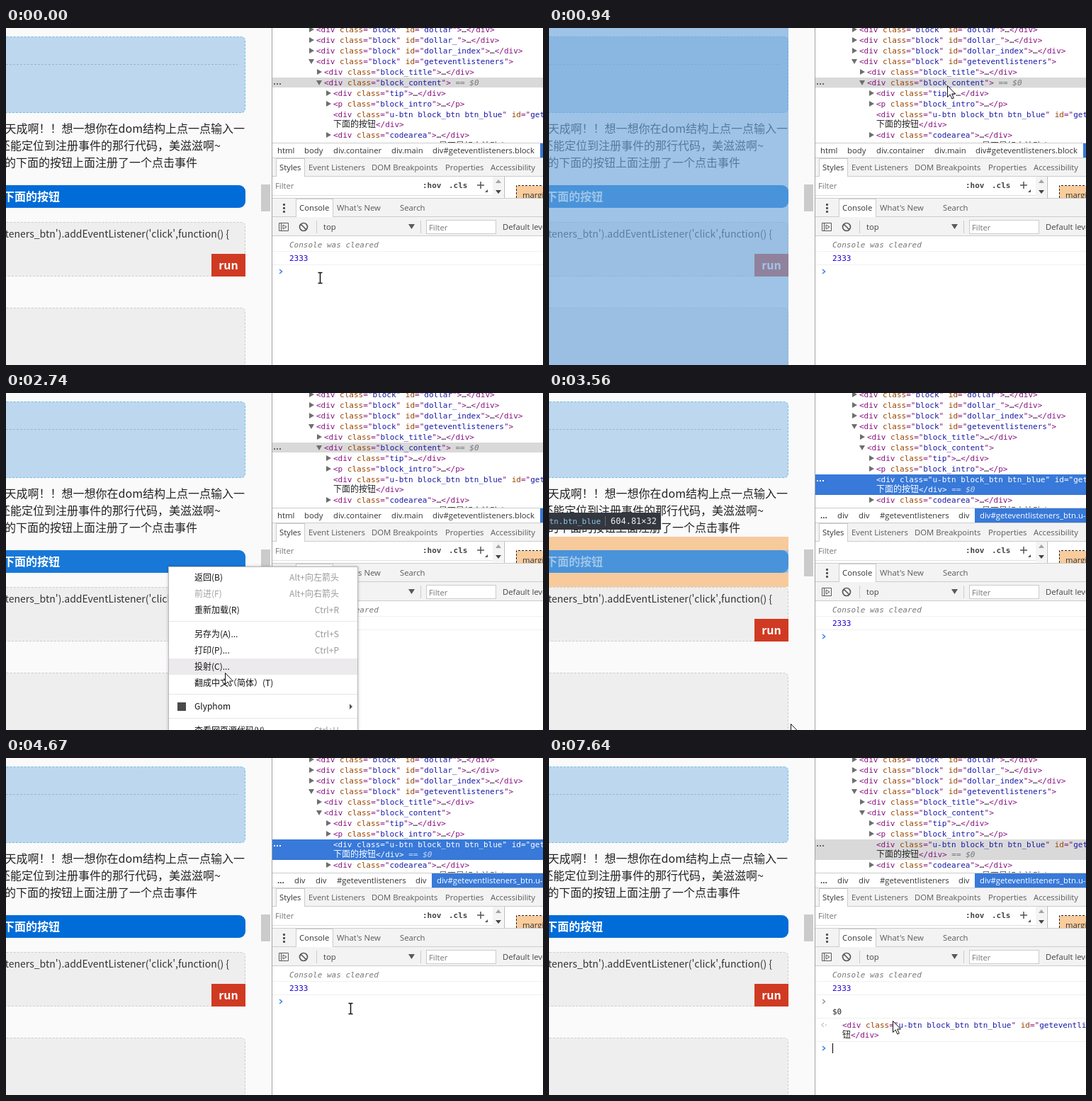
Recreate the animation shown at these times as an HTML page with a canvas. Size 758 px wide and 476 px high, loop 8000 ms.

```html
<?xml version="1.0" encoding="utf-8"?>
<!DOCTYPE html>
<html lang="zh">
<head>
<style>
html, body { margin: 0; width: 100%; height: 100%; overflow: hidden; }
canvas { display: block; width: 758px; height: 476px; }
</style>
</head>
<body>
<canvas id="stage" width="758" height="476"></canvas>
<script>
const ctx = document.getElementById('stage').getContext('2d');
const LOOP = 8000;

const CJK_FAMILY = '"Noto Sans CJK SC", "Noto Sans CJK", "Noto Sans CJK JP", sans-serif';
const UI = '11.3px "Open Sans", sans-serif';
const MONO = '11px "DejaVu Sans Mono", monospace';
const cjk = (size, weight = '') => `${weight} ${size}px ${CJK_FAMILY}`;
const BLUE = '#3879d9', GRAY_ROW = '#d9d9d9', PURPLE = '#881280';

// time, x, y, pointer shape
const POINTER = [
  [0, 443, 353, 'beam'], [250, 448, 344, 'beam'], [390, 468, 302, 'arrow'],
  [530, 508, 228, 'arrow'], [670, 540, 158, 'arrow'], [810, 557, 104, 'arrow'],
  [940, 562, 81, 'arrow'], [1090, 450, 140, 'arrow'], [1240, 315, 226, 'hand'],
  [1390, 296, 232, 'hand'], [1520, 286, 230, 'hand'], [1660, 283, 227, 'hand'],
  [1940, 258, 236, 'hand'], [2070, 229, 245, 'hand'], [2200, 229, 245, 'arrow'],
  [2340, 235, 262, 'arrow'], [2480, 255, 302, 'arrow'], [2610, 284, 352, 'arrow'],
  [2740, 309, 395, 'arrow'], [2860, 326, 440, 'arrow'], [2980, 336, 470, 'arrow'],
  [3130, 338, 492, 'arrow'], [3560, 341, 467, 'arrow'], [3700, 350, 451, 'arrow'],
  [3840, 365, 429, 'arrow'], [3980, 386, 405, 'arrow'], [4120, 412, 384, 'arrow'],
  [4270, 442, 367, 'arrow'], [4410, 464, 358, 'arrow'], [4530, 478, 354, 'beam'],
  [4670, 486, 354, 'beam'], [4810, 486, 358, 'beam'], [4950, 485, 366, 'arrow'],
  [5090, 485, 371, 'arrow']
];

// x, y, markup, disclosure (1 closed, 2 open), page area lit on hover
const TREE = [
  [438, 2, '<div class="block" id="dollar">…</div>', 1],
  [438, 17, '<div class="block" id="dollar_">…</div>', 1],
  [438, 32, '<div class="block" id="dollar_index">…</div>', 1],
  [438, 47, '<div class="block" id="geteventlisteners">', 2],
  [449, 62, '<div class="block_title">…</div>', 1],
  [449, 77, '<div class="block_content">', 2, [0, 476]],
  [462, 92, '<div class="tip">…</div>', 1, [12, 120]],
  [462, 107, '<p class="block_intro">…</p>', 1, [130, 202]],
  [462, 122, '<div class="u-btn block_btn btn_blue" id="geteventlisteners_btn">', 0, [222, 254]],
  [462, 136, '下面的按钮</div>', 0, [222, 254]],
  [462, 151, '<div class="codearea">…</div>', 1, [274, 351]]
];

const MENU = [
  [261, '返回(B)', 'Alt+向左箭头'], [284, '前进(F)', 'Alt+向右箭头', '#a0a0a0'],
  [307, '重新加载(R)', 'Ctrl+R'], [341, '另存为(A)...', 'Ctrl+S'],
  [364, '打印(P)...', 'Ctrl+P'], [387, '投射(C)...', ''],
  [410, '翻成中文（简体）(T)', ''], [443, 'Glyphom', ''],
  [477, '查看网页源代码(V)', 'Ctrl+U']
];

function rect(x, y, w, h, color) {
  ctx.fillStyle = color;
  ctx.fillRect(x, y, w, h);
}

function text(str, x, y, color = '#333', font = UI, align = 'left') {
  ctx.font = font;
  ctx.fillStyle = color;
  ctx.textAlign = align;
  ctx.fillText(str, x, y);
  return x + ctx.measureText(str).width;
}

function shape(path, x, y, fill, stroke, width = 1) {
  ctx.save();
  ctx.translate(x, y);
  const p = new Path2D(path);
  if (fill) { ctx.fillStyle = fill; ctx.fill(p); }
  if (stroke) { ctx.strokeStyle = stroke; ctx.lineWidth = width; ctx.stroke(p); }
  ctx.restore();
}

function roundBox(x, y, w, h, r, fill, border) {
  ctx.beginPath();
  ctx.roundRect(x, y, w, h, r);
  ctx.fillStyle = fill;
  ctx.fill();
  if (!border) return;
  ctx.setLineDash([3, 2]);
  ctx.strokeStyle = border;
  ctx.lineWidth = 1;
  ctx.stroke();
  ctx.setLineDash([]);
}

function markup(src, x, y, plain) {
  const put = (s, color) => { x = text(s, x, y, plain || color, s > '\u2fff' ? cjk(12) : MONO); };
  for (const [token, name, open, value] of src.matchAll(/(\w+)(=")([^"]*)|./gu)) {
    if (name) {
      put(name, '#994500');
      put(open, PURPLE);
      put(value, '#1a1aa6');
    } else put(token, token > '\u2000' ? '#222' : PURPLE);
  }
  return x;
}

function drawPage(hovered) {
  rect(0, 0, 375, 476, '#fafafa');
  roundBox(-9.5, 12.5, 347, 107, 5, '#bdd7ee', '#71bce4');
  ctx.setLineDash([3, 2]);
  shape('M0 .5H327', 0, 51, null, '#98b6cf');
  ctx.setLineDash([]);
  const body = cjk(16);
  text('天成啊！！想一想你在dom结构上点一点输入一', 337, 148, '#222', body, 'right');
  text('还能定位到注册事件的那行代码，美滋滋啊~', 303, 172, '#222', body, 'right');
  text('的下面的按钮上面注册了一个点击事件', 270, 196, '#222', body, 'right');
  roundBox(-20, 222, 358, 32, 9, hovered ? '#1878d8' : '#006cd8');
  text('下面的按钮', 76, 244, '#fff', cjk(16, 'bold'), 'right');
  roundBox(-9.5, 274.5, 347, 76, 5, '#eee', '#ccc');
  text("teners_btn').addEventListener('click',function() {", 315, 296, '#333', cjk(14), 'right');
  rect(290, 319, 48, 32, '#d03a22');
  text('run', 314, 341, '#fff', cjk(16, 'bold'), 'center');
  roundBox(-9.5, 395.5, 347, 100, 5, '#eee', '#ccc');
  rect(360, 221, 13, 38, '#cbcbcb');
}

function drawInspection() {
  rect(0, 203, 338, 19, 'rgba(246,178,107,.66)');
  rect(0, 254, 338, 20, 'rgba(246,178,107,.66)');
  rect(0, 222, 338, 32, 'rgba(111,168,220,.66)');
  rect(0, 169, 158, 24, '#333740');
  rect(79, 174, 1, 14, '#686c74');
  text('tn.btn_blue', 73, 185, '#8ec4e8', MONO, 'right');
  text('604.81×32', 87, 185, '#eee', MONO.replace('11', '12'));
}

function drawTree(t, hoverRow) {
  rect(376, 0, 382, 163, '#fff');
  const inspected = t >= 3400;
  const focused = inspected && t < 4810;
  if (hoverRow) rect(376, hoverRow[1] - 7, 382, 15, '#ebf2fb');
  const [top, height] = inspected ? [115, 29] : [70, 14];
  rect(376, top, 382, height, focused ? BLUE : GRAY_ROW);
  for (const [x, y, src, fold] of TREE) {
    const selected = inspected ? y === 122 || y === 136 : y === 77;
    const end = markup(src, x, y + 4, selected && focused ? '#fff' : '');
    if (fold) shape(fold === 1 ? 'M-3 -4L4 0L-3 4Z' : 'M-4 -3H4L0 4Z', x - 7, y, '#6e6e6e');
    if (selected && y !== 122) text(' == $0', end, y + 4, focused ? '#c3d7f4' : '#777', 'italic ' + MONO);
  }
  const dots = focused ? '#fff' : '#666';
  for (let i = 0; i < 3; i++) rect(378 + i * 4, inspected ? 123 : 78, 2, 2, dots);
  text('是否是如小计动↓', 611, 171, '#333', cjk(12));
  drawBreadcrumbs(inspected);
}

function drawBreadcrumbs(inspected) {
  rect(376, 162, 382, 22, '#fff');
  rect(376, 162, 382, 1, '#ccc');
  rect(inspected ? 601 : 754, 163, 157, 20, BLUE);
  const crumbs = inspected
    ? [['div', 407], ['div', 437], ['#geteventlisteners', 467], ['div', 578]]
    : [['html', 383], ['body', 421], ['div.container', 462], ['div.main', 544],
       ['div#geteventlisteners.block', 602]];
  for (const [label, x] of crumbs) text(label, x, 177);
  if (!inspected) return;
  text('...', 383, 177, '#222', 'bold ' + UI);
  text('div#geteventlisteners_btn.u-btn', 608, 177, '#fff');
}

function tabBar(y, x, w, tabs) {
  rect(376, y, 382, 27, '#f3f3f3');
  rect(376, y, 382, 1, '#ccc');
  rect(376, y + 26, 382, 1, '#ccc');
  rect(x, y + 1, w, 26, '#ccc');
  rect(x + 1, y + 2, w - 2, 25, '#fff');
  tabs.forEach(([label, tx], i) => text(label, tx, y + 18, i ? '#5a5a5a' : '#333'));
}

function drawStyles() {
  tabBar(183, 381, 41, [['Styles', 386], ['Event Listeners', 427], ['DOM Breakpoints', 516],
    ['Properties', 620], ['Accessibility', 684]]);
  rect(376, 210, 382, 30, '#fff');
  text('Filter', 380, 227, '#777');
  text(':hov', 588, 226, '#444', 'bold ' + MONO);
  text('.cls', 625, 226, '#444', 'bold ' + MONO);
  shape('M0 -5V5M-5 0H5', 670, 222, null, '#555', 1.5);
  shape('M0 4H4V0Z', 676, 228, '#555');
  rect(376, 236, 327, 1, '#e0e0e0');
  rect(687, 210, 15, 29, '#f4f4f4');
  shape('M-4 2H4L0 -3Z', 695, 217, '#a3a3a3');
  shape('M-4 -2H4L0 3Z', 695, 231, '#444');
  rect(703, 210, 1, 30, '#bbb');
  rect(720, 223, 38, 17, '#f9cc9d');
  ctx.setLineDash([3, 2]);
  shape('M.5 18V.5H40', 720, 222, null, '#222');
  ctx.setLineDash([]);
  text('margin', 729, 240, '#333');
}

function chevron(y, color) {
  shape('M-2 -3L1.5 0L-2 3', 388, y, null, color, 1.5);
}

function drawConsole(t) {
  rect(376, 240, 382, 236, '#fff');
  tabBar(240, 409, 53, [['Console', 414], ["What's New", 467], ['Search', 556]]);
  for (const y of [248, 253, 258]) rect(391, y, 3, 3, '#5a5a5a');
  rect(376, 267, 382, 27, '#f3f3f3');
  rect(376, 293, 382, 1, '#ccc');
  shape('M.5 .5H13.5V11.5H.5ZM3.5 0V12M6 3V9L11 6Z', 385, 275, null, '#5a5a5a');
  shape('M5.5 0A5.5 5.5 0 1 1 -5.5 0A5.5 5.5 0 1 1 5.5 0M-4 -4L4 4', 420, 281, null, '#5a5a5a', 1.7);
  rect(438, 272, 1, 18, '#ccc');
  text('top', 448, 285, '#444');
  shape('M-4 -3H5L.5 4Z', 572, 280, '#5a5a5a');
  rect(585, 272, 1, 18, '#ccc');
  rect(593, 271, 99, 20, '#ccc');
  rect(594, 272, 97, 18, '#fff');
  text('Filter', 597, 286, '#777');
  text('Default levels', 701, 285, '#444');

  text('Console was cleared', 400, 310, '#777', 'italic ' + MONO);
  rect(376, 315, 382, 1, '#f0f0f0');
  text('2333', 400, 329, '#1c00cf', MONO);
  rect(376, 334, 382, 1, '#f0f0f0');

  const done = t >= 7490;
  chevron(344, done ? '#999' : '#367cf1');
  if (t >= 6070) text(t < 7090 ? '$' : '$0', 400, 362, '#222', MONO);
  if (done) {
    rect(376, 367, 382, 1, '#f0f0f0');
    shape('M0 -3L-3.5 0L0 3M2 0H4', 388, 377, null, '#aaa');
    markup('<div class="u-btn block_btn btn_blue" id="geteventlisteners_btn">', 414, 381);
    markup('钮</div>', 414, 395);
    rect(376, 400, 382, 1, '#f0f0f0');
    chevron(410, '#367cf1');
  }
  if (t >= 6070 && t < 7090) {
    rect(396, 366, 41, 59, '#c4c4c4');
    rect(397, 367, 39, 57, '#fff');
    rect(397, 367, 39, 14, '#e4e4e4');
    ['$', '$$', '$_', '$0'].forEach((s, i) => text(s, 400, 378 + i * 14, '#222', MONO));
  }
  const caret = t >= 7640 ? [400, 403] : done ? null
    : t >= 7090 ? [414, 351]
    : t >= 6530 ? null
    : t >= 6070 ? [407, 351]
    : t >= 5680 ? [400, 351]
    : t >= 4950 && t < 5550 ? [400, 337] : null;
  if (caret) rect(caret[0], caret[1], 1, 14, '#000');
}

function drawMenu(pointerY) {
  ctx.save();
  ctx.shadowColor = 'rgba(0,0,0,.25)';
  ctx.shadowBlur = 4;
  rect(229, 245, 268, 260, '#bababa');
  ctx.restore();
  rect(230, 246, 266, 240, '#fff');
  for (const [y, label, keys, color = '#111'] of MENU) {
    if (Math.abs(pointerY - y) < 11.5) rect(230, y - 12, 266, 23, '#eceaed');
    text(label, 266, y + 4, color, cjk(12));
    text(keys, 470, y + 4, '#999', cjk(12), 'right');
  }
  for (const y of [322, 425, 459]) rect(230, y, 266, 1, '#e6e6e6');
  rect(242, 437, 12, 12, '#4a4a4a');
  shape('M0 -4L4 0L0 4Z', 485, 443, '#555');
}

function drawPointer(x, y, kind) {
  if (kind === 'beam') {
    shape('M-3 -7.5H-1L0 -7L1 -7.5H3M0 -7V7M-3 7.5H-1L0 7L1 7.5H3', x + .5, y, null, '#111', 1.5);
  } else if (kind === 'arrow') {
    shape('M.5 .5V16.5L4.2 13L6.8 19L9.3 18L6.7 12H11.5Z', x, y, '#fff', '#111');
  } else {
    shape('M-1.5 11V1.5Q0 -1 1.5 1.5V7Q3.5 5.5 4.5 7.5Q6.5 6.5 7.5 8.5Q10 7.5 10 10.5V14L8 18V21H-1.5V18L-6 12.5Q-5 9.5 -1.5 12ZM1.5 7V11M4.5 8V11M7.5 9V11',
      x, y, '#fff', '#111');
  }
}

function draw(t) {
  const [, x, y, kind] = POINTER.findLast(k => k[0] <= t);
  const hoverRow = x > 376 && y < 162 ? TREE.find(row => Math.abs(row[1] - y) <= 7.5) : null;
  const lit = hoverRow && hoverRow[4];
  drawPage(t >= 1240 && t < 3400);
  if (lit) rect(0, lit[0], 338, lit[1] - lit[0], 'rgba(111,168,220,.66)');
  if (t >= 3400 && t < 4530) drawInspection();
  drawTree(t, hoverRow);
  drawStyles();
  drawConsole(t);
  rect(375, 0, 1, 476, '#a3a3a3');
  if (t >= 2200 && t < 3400) drawMenu(y);
  drawPointer(x, y, kind);
}

const start = performance.now();
function frame() {
  draw((performance.now() - start) % LOOP);
  requestAnimationFrame(frame);
}
frame();
</script>
</body>
</html>
```
